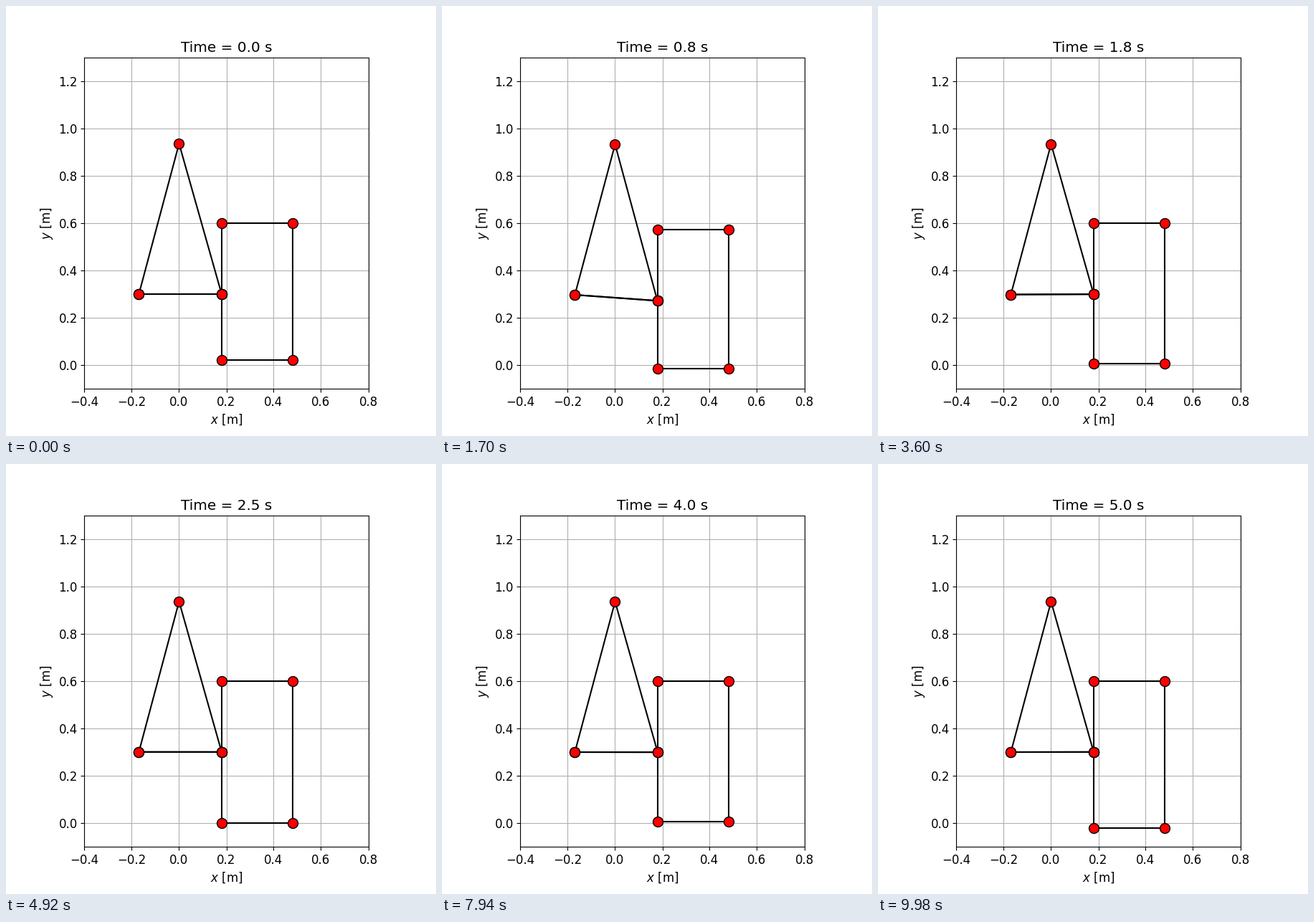
Recreate the animation shown at these times as a matplotlib script. Size 600x600 px, loop 10000 ms.

```python
import numpy as np
import matplotlib.pyplot as plt
from matplotlib.animation import FuncAnimation

FRAMES = 500
DT = 0.01        # simulated seconds per frame
SUBSTEPS = 10

# Quarter-car model: body and wheel masses, springs, damper
BODY_MASS, WHEEL_MASS = 400.0, 53.0
SPRING, DAMPER, TYRE = 15000.0, 1300.0, 130000.0

# Rest geometry in metres
PIVOT_X, PIVOT_Y = -0.17, 0.30
TOP_Y = 0.936
ARM = 0.35
RADIUS, WIDTH = 0.30, 0.30


def road(t):
    """Ground height: a chirp whose frequency rises by 10 Hz per second."""
    return 0.02 * np.cos(10 * np.pi * t**2)


def slope(t, state):
    body, wheel, body_v, wheel_v = state
    strut = SPRING * (wheel - body) + DAMPER * (wheel_v - body_v)
    tyre = TYRE * (road(t) - wheel)
    return np.array([body_v, wheel_v,
                     strut / BODY_MASS, (tyre - strut) / WHEEL_MASS])


def simulate():
    """Body and wheel displacement for every frame (Runge-Kutta)."""
    h = DT / SUBSTEPS
    state = np.zeros(4)
    result = np.zeros((FRAMES, 2))
    for i in range(FRAMES):
        result[i] = state[:2]
        for j in range(SUBSTEPS):
            t = i * DT + j * h
            k1 = slope(t, state)
            k2 = slope(t + h / 2, state + h / 2 * k1)
            k3 = slope(t + h / 2, state + h / 2 * k2)
            k4 = slope(t + h, state + h * k3)
            state = state + h / 6 * (k1 + 2 * k2 + 2 * k3 + k4)
    return result


motion = simulate()

plt.rcParams.update({"font.family": "DejaVu Sans", "font.size": 12})
fig, ax = plt.subplots(figsize=(6, 6), dpi=100)
ax.set_aspect("equal")
ax.set_xlim(-0.4, 0.8)
ax.set_ylim(-0.1, 1.3)
ax.set_xlabel("$x$ [m]")
ax.set_ylabel("$y$ [m]")
ax.grid(True)
title = ax.set_title("")


def linkage():
    line, = ax.plot([], [], "o-", color="black", lw=1.5, ms=10,
                    markerfacecolor="red", markeredgecolor="black")
    return line


frame_line, arm_line, wheel_line = linkage(), linkage(), linkage()


def update(i):
    t = i * DT
    body, wheel = motion[i]
    pivot = (PIVOT_X, PIVOT_Y + body)
    top = (0, TOP_Y + body)
    hub_x = PIVOT_X + np.sqrt(ARM**2 - (wheel - body)**2)
    hub = (hub_x, PIVOT_Y + wheel)
    outer_x = hub_x + WIDTH
    upper, lower = hub[1] + RADIUS, road(t)

    frame_line.set_data(*zip(pivot, top, hub, pivot))
    arm_line.set_data(*zip(pivot, hub))
    wheel_line.set_data([hub_x, hub_x, outer_x, outer_x, hub_x, hub_x],
                        [hub[1], upper, upper, lower, lower, hub[1]])
    title.set_text(f"Time = {t:.1f} s")
    return frame_line, arm_line, wheel_line, title


anim = FuncAnimation(fig, update, frames=FRAMES, interval=20,
                     repeat=True, repeat_delay=0)
plt.show()
```
